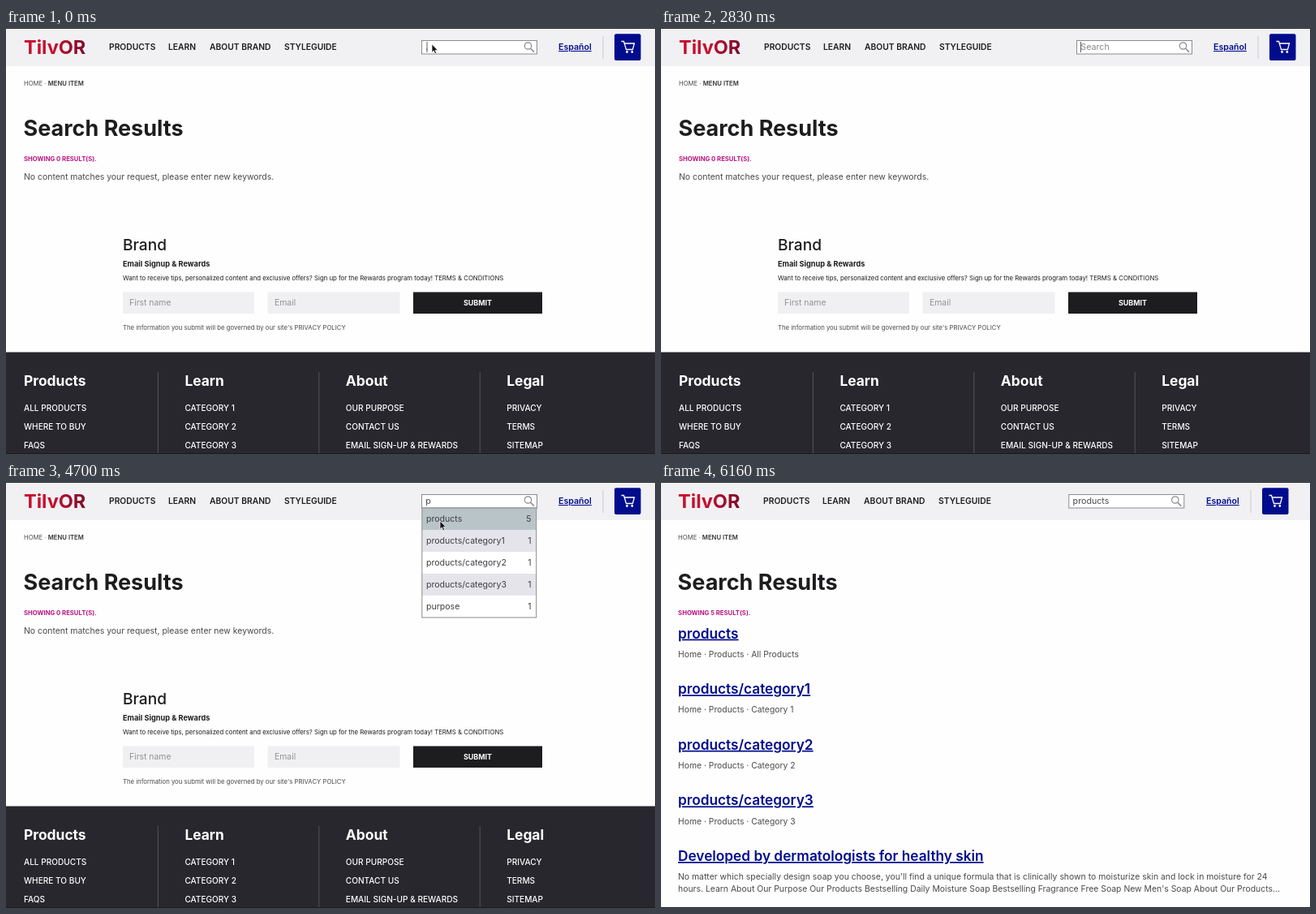
Recreate the animation shown at these times as an HTML page. Size 800 by 525 pixels, loop 6250 ms.

```html
<!DOCTYPE html>
<html lang="en">
<head>
<meta charset="utf-8">
<title>Site search</title>
<style>
  html, body { margin: 0; width: 100%; height: 100%; overflow: hidden; background: #fefefe; }
  svg { display: block; width: 800px; height: 525px; font-family: Inter, "Open Sans", sans-serif; }
</style>
</head>
<body>
<svg id="stage" viewBox="0 0 800 525"></svg>
<script>
const INK = '#1d1d1f', GREY = '#4a4a4d', BLUE = '#000c8c', PINK = '#b8147f';
const LOOP = 6250, SELECT = 250, HIDE = 500, CLEAR = 1580, TYPE = 2910,
      POINT = 4250, ARRIVE = 4550, RESULTS = 4790, LEAVE = 5580;

const text = (x, y, size, weight, fill, str, extra = '') =>
  `<text x="${x}" y="${y}" font-size="${size}" font-weight="${weight}" fill="${fill}" ${extra}>${str}</text>`;
const rect = (x, y, w, h, fill, extra = '') =>
  `<rect x="${x}" y="${y}" width="${w}" height="${h}" fill="${fill}" ${extra}/>`;
const line = (d, stroke, width = 1) =>
  `<path d="${d}" fill="none" stroke="${stroke}" stroke-width="${width}"/>`;
const group = (id, body) => `<g id="${id}">${body}</g>`;
const UNDERLINE = 'text-decoration="underline"', RIGHT = 'text-anchor="end"';

const pageTop = () =>
  text(22, 32, 23.5, 700, 'url(#red)', 'TilvOR') +
  [[127, 'PRODUCTS'], [200, 'LEARN'], [251, 'ABOUT BRAND'], [343, 'STYLEGUIDE']]
    .map(([x, s]) => text(x, 27, 10.3, 600, INK, s)).join('') +
  text(22, 70.5, 7.7, 400, GREY, 'HOME · <tspan font-weight="600" fill="#333">MENU ITEM</tspan>') +
  text(21.5, 133.3, 27, 700, INK, 'Search Results');

const searchBox = () =>
  rect(512.5, 15.5, 142, 16.5, '#fff', 'stroke="#8b8b8d"') +
  '<circle cx="643.5" cy="22" r="4.2" fill="none" stroke="#8b8b8d" stroke-width="1.2"/>' +
  line('M646.6 25.2L651 29.6', '#8b8b8d', 1.5) +
  rect(517, 17, 3, 13.5, '#9cc8f5', 'id="selection"') +
  text(517.3, 27.2, 10.7, 400, GREY, '', 'id="query"') +
  rect(0, 17, 0.8, 13, '#333', 'id="caret"');

const headerTools = () =>
  text(681, 27, 10.6, 600, BLUE, 'Español', UNDERLINE) +
  line('M736 10V38', '#cbcbcd') +
  rect(750, 7.3, 32.5, 32.7, BLUE, 'rx="2"') +
  line('M758.5 16.5H761.5L764.5 26.5H772.5L774.5 19H762.5', '#fff', 1.3) +
  '<circle cx="765.5" cy="29.5" r="1.4" fill="#fff"/><circle cx="771.8" cy="29.5" r="1.4" fill="#fff"/>';

const signup = () =>
  text(144, 273.5, 19.1, 500, INK, 'Brand') +
  text(144, 294, 9.2, 700, INK, 'Email Signup &amp; Rewards') +
  text(144, 311.3, 7.78, 400, INK, 'Want to receive tips, personalized content and exclusive offers? Sign up for the Rewards program today! TERMS &amp; CONDITIONS') +
  rect(144, 325.5, 162, 26.5, '#f0f0f2') + text(152, 342.3, 10.4, 400, '#929296', 'First name') +
  rect(322.5, 325.5, 163, 26.5, '#f0f0f2') + text(331, 342.3, 10.4, 400, '#929296', 'Email') +
  rect(502, 325.5, 159, 26.5, INK) + text(581.5, 342, 8.95, 700, '#fff', 'SUBMIT', 'text-anchor="middle"') +
  text(144, 372, 7.74, 400, GREY, "The information you submit will be governed by our site's PRIVACY POLICY");

const footer = () => rect(0, 399.5, 800, 125.5, '#28272e') +
  [['Products', 'ALL PRODUCTS', 'WHERE TO BUY', 'FAQS'],
   ['Learn', 'CATEGORY 1', 'CATEGORY 2', 'CATEGORY 3'],
   ['About', 'OUR PURPOSE', 'CONTACT US', 'EMAIL SIGN-UP &amp; REWARDS'],
   ['Legal', 'PRIVACY', 'TERMS', 'SITEMAP']].map(([head, ...links], i) => {
    const x = 22 + i * 198.4;
    return (i ? line(`M${x - 33} 424V525`, '#55545b') : '') +
      text(x, 440.5, 17.4, 700, '#fff', head) +
      links.map((s, j) => text(x, 471.8 + j * 23, 10.1, 500, '#fff', s)).join('');
  }).join('');

const dropdown = () => [['products', 5], ['products/category1', 1], ['products/category2', 1],
  ['products/category3', 1], ['purpose', 1]].map(([name, count], i) => {
    const y = 32.3 + i * 26.9;
    return rect(513, y, 140.5, 26.9, i % 2 ? '#e4e4ea' : '#fff', i ? '' : 'id="firstRow"') +
      text(518, y + 17, 10.55, 400, '#3f3f44', name) +
      text(647.5, y + 17, 10.55, 400, '#3f3f44', count, RIGHT);
  }).join('') + rect(512.8, 32, 140.9, 135, 'none', 'stroke="#8b8b8d"');

const results = () =>
  ['products', 'products/category1', 'products/category2', 'products/category3',
   'Developed by dermatologists for healthy skin'].map((name, i) => {
    const y = 192.6 + i * 68.6;
    return text(21, y, 17.25, 600, BLUE, name, UNDERLINE) + (i < 4 ?
      text(21, y + 23.2, 10.35, 400, GREY, 'Home · Products · ' + (i ? 'Category ' + i : 'All Products')) : '');
  }).join('') +
  text(21, 490.2, 10.42, 400, GREY, "No matter which specially design soap you choose, you'll find a unique formula that is clinically shown to moisturize skin and lock in moisture for 24") +
  text(21, 505, 10.42, 400, GREY, "hours. Learn About Our Purpose Our Products Bestselling Daily Moisture Soap Bestselling Fragrance Free Soap New Men's Soap About Our Products...");

const stage = document.getElementById('stage');
stage.innerHTML =
  '<defs><linearGradient id="red"><stop offset=".45" stop-color="#c8102e"/><stop offset="1" stop-color="#7d0c2b"/></linearGradient></defs>' +
  rect(0, 0, 800, 525, '#fefefe') + rect(0, 0, 800, 47, '#f1f1f3') +
  group('top', pageTop()) +
  group('emptyPage',
    text(22, 187, 10.43, 400, GREY, 'No content matches your request, please enter new keywords.') +
    signup() + footer()) +
  group('resultPage', results()) +
  text(22, 164, 7.7, 700, PINK, '', 'id="count"') +
  group('search', searchBox()) +
  group('tools', headerTools()) +
  group('list', dropdown()) +
  rect(0, 0, 800, 1, '#2a2a2c') + rect(0, 524, 800, 1, '#1a1a1c') +
  group('pointer', '<path d="M0 0V10.2L2.3 8L3.9 11.8L5.6 11L4 7.4H7.2Z" fill="#111" stroke="#fff" stroke-width=".7"/>');

const el = id => document.getElementById(id);
const show = (id, on) => el(id).setAttribute('display', on ? 'inline' : 'none');
const put = (id, str) => { if (el(id).textContent !== str) el(id).textContent = str; };
const shift = (id, x, y = 0) => el(id).setAttribute('transform', `translate(${x} ${y})`);

function draw(t) {
  const found = t >= RESULTS, typed = t >= TYPE, cleared = t >= CLEAR;
  show('emptyPage', !found);
  show('resultPage', found);
  shift('top', found ? -0.9 : 0);
  shift('count', found ? -0.9 : 0);
  shift('search', found ? -9.7 : 0);
  shift('tools', found ? -9 : 0);
  put('count', `SHOWING ${found ? 5 : 0} RESULT(S).`);

  put('query', found ? 'products' : typed ? 'p' : cleared ? 'Search' : '.');
  el('query').setAttribute('fill', cleared && !typed ? '#88888c' : GREY);
  show('selection', t >= SELECT && !cleared);
  show('list', typed && !found);

  const blink = typed ? (t - 2700) % 1000 < 500 : cleared ? (t - CLEAR) % 1000 < 500 : t < SELECT;
  show('caret', blink && t < POINT);
  el('caret').setAttribute('x', typed ? 524.5 : cleared ? 517 : 518.6);

  const p = Math.min(1, Math.max(0, (t - POINT) / (ARRIVE - POINT)));
  const ease = p * p * (3 - 2 * p);
  const y = 20 + 28 * ease;
  shift('pointer', 525 + 10 * ease, y);
  show('pointer', t < HIDE || (t >= POINT && t < LEAVE));
  el('firstRow').setAttribute('fill', y > 32 ? '#b9c4c8' : '#fff');
}

function tick() {
  draw(performance.now() % LOOP);
  requestAnimationFrame(tick);
}
tick();
</script>
</body>
</html>
```
